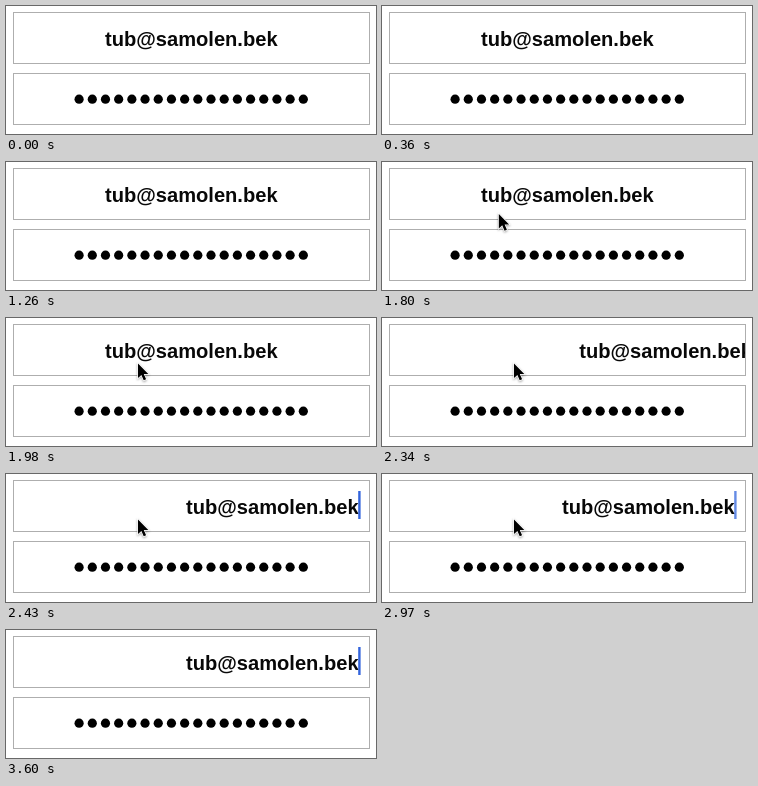
An HTML page that plays this animation: 370 by 128 pixels, repeating every 3.78 s.

```html
<!DOCTYPE html>
<html lang="en">
<head>
<meta charset="utf-8">
<title>Focused input</title>
<style>
  html, body { margin: 0; width: 100%; height: 100%; overflow: hidden; background: #fff; }
  svg { display: block; width: 370px; height: 128px; }
  .field { fill: #fff; stroke: #aeaeae; }
  text { font: bold 20.1px "Liberation Sans", Arial, sans-serif; fill: #080808; }
  #pointer {
    stroke: #fff;
    stroke-width: 1.4px;
    paint-order: stroke;
    filter: drop-shadow(0 1px 1px rgba(0, 0, 0, .35));
  }
</style>
</head>
<body>
<svg viewBox="0 0 370 128">
  <clipPath id="inside"><rect x="8" y="7" width="355" height="50"/></clipPath>
  <rect class="field" x="7.5" y="6.5" width="356" height="51"/>
  <rect class="field" x="7.5" y="67.5" width="356" height="51"/>
  <g clip-path="url(#inside)">
    <g id="entry">
      <text y="39.5">tub@samolen.bek</text>
      <rect id="caret" x="172.2" y="17" width="2.4" height="28" fill="#3264dc"/>
    </g>
  </g>
  <g id="dots"></g>
  <path id="pointer" d="M0 0V14.5L3.4 11.4L5.7 16.8L8.1 15.8L5.8 10.5H10.3Z"/>
</svg>
<script>
  const LOOP = 3780, TICK = 90;
  const ENTER = 1260, MOVE = 1620, FOCUS = 2160, BLINK = 2880, HIDE = 3240, RETURN = 3420;
  const $ = id => document.getElementById(id);

  const progress = (time, start, length) => Math.min(1, Math.max(0, (time - start) / length));
  const easeOut = (p, power = 1.6) => 1 - (1 - p) ** power;
  const easeInOut = p => (1 - Math.cos(Math.PI * p)) / 2;
  const mix = (from, to, amount) => from + (to - from) * amount;

  for (let i = 0; i < 18; i++) {
    const dot = document.createElementNS("http://www.w3.org/2000/svg", "circle");
    dot.setAttribute("cx", 73.1 + i * 13.19);
    dot.setAttribute("cy", 93.2);
    dot.setAttribute("r", 4.6);
    $("dots").append(dot);
  }

  function entryX(time) {
    return time < FOCUS ? 99 : mix(280, 180, easeOut(progress(time, FOCUS, 270)));
  }

  function caretOpacity(time) {
    if (time < FOCUS) return 0;
    return 1 - easeInOut(progress(time, BLINK, 270)) + easeInOut(progress(time, RETURN, 180));
  }

  function pointerPosition(time) {
    if (time < MOVE) {
      const entered = easeOut(progress(time, ENTER, 180));
      return [mix(372, 86, entered), mix(130, 73, entered)];
    }
    const moved = progress(time, MOVE, 360);
    return [mix(86, 132, easeOut(moved)), mix(73, 45.5, easeOut(moved, 2.1))];
  }

  function draw() {
    const time = Math.floor(performance.now() % LOOP / TICK) * TICK;
    $("entry").setAttribute("transform", `translate(${entryX(time)} 0)`);
    $("caret").setAttribute("opacity", caretOpacity(time));
    $("pointer").setAttribute("transform", `translate(${pointerPosition(time)})`);
    $("pointer").setAttribute("visibility", time > ENTER && time < HIDE ? "visible" : "hidden");
    requestAnimationFrame(draw);
  }
  draw();
</script>
</body>
</html>
```
